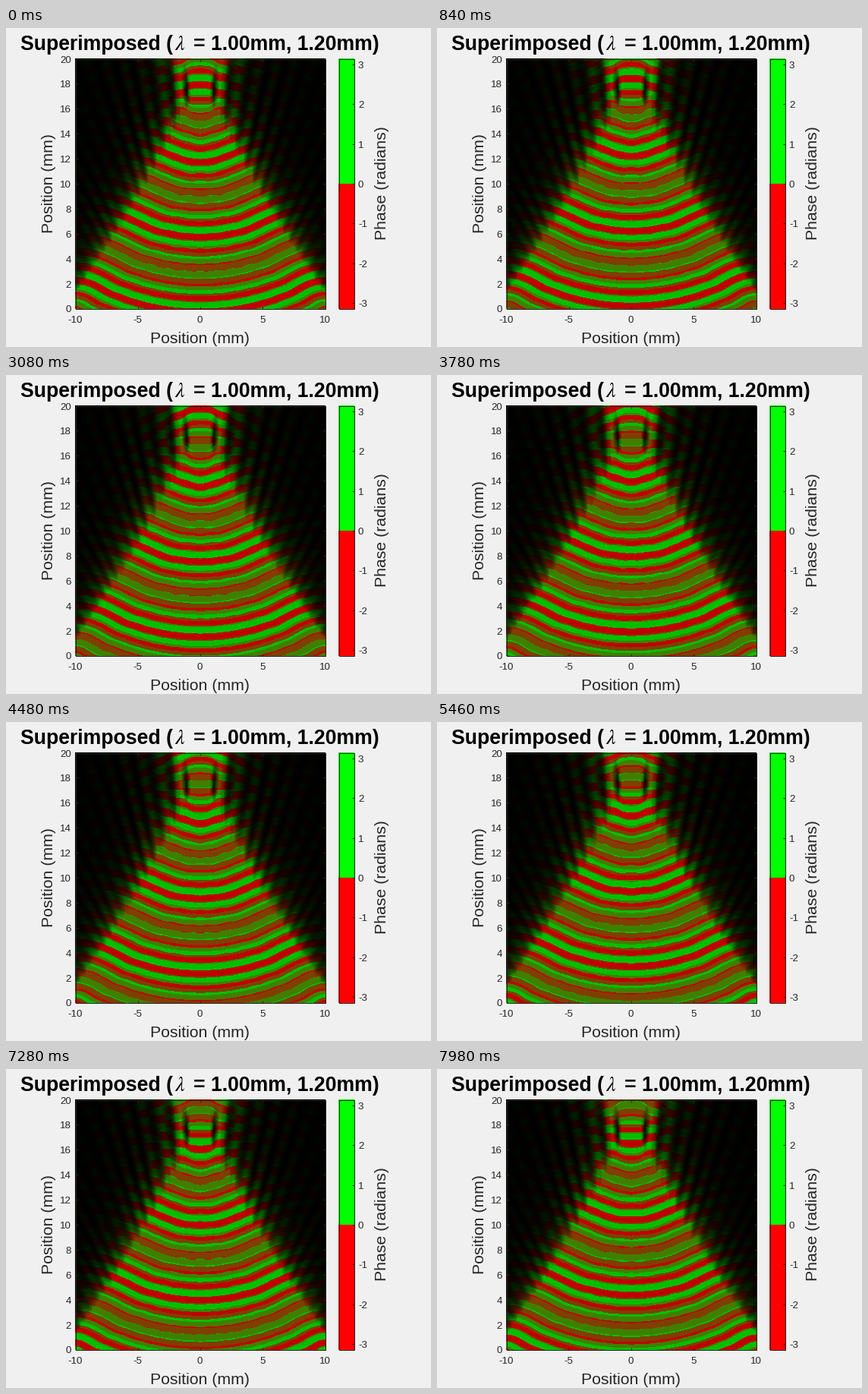
These frames come from a looping animation (560x420 px, 8 s). A matplotlib script:

```python
import numpy as np
import matplotlib.pyplot as plt
from matplotlib.animation import FuncAnimation

plt.rcParams["font.family"] = "Liberation Sans"
plt.rcParams["mathtext.fontset"] = "stix"

W, H = 560, 420
LEFT, TOP, SIZE = 91, 40, 329          # plot area in pixels
BAR_X, BAR_W = 438, 21
INK = (0.15, 0.15, 0.15)

HALF, DEPTH, FOCUS = 10.0, 20.0, 17.5  # mm
WAVES = (1.0, 1.2)                     # wavelengths, mm
WEIGHTS = (0.25, 0.5)                  # half-transparent layers over black
CLIP = 0.065                           # intensity shown at full brightness
ADVANCE = 0.0815                       # mm travelled per step
TICK_MS, STEP_MS, LOOP_MS = 20, 140, 8000

N = SIZE + 1
SOURCES = 200
pitch = 2 * HALF / SOURCES
x = (np.arange(N // 2) + 0.5) * 2 * HALF / N          # right half only
y = DEPTH - (np.arange(N) + 0.5) * DEPTH / N


def focused_field(wavelength):
    """Sum of point sources on y = 0, delayed to meet at the focus."""
    k = 2 * np.pi / wavelength
    half = np.zeros((N, N // 2), complex)
    for s in (np.arange(SOURCES) + 0.5) * pitch - HALF:
        r = np.hypot(x - s, y[:, None])
        half += np.exp(1j * k * (r - np.hypot(s, FOCUS) + FOCUS)) / r
    half *= pitch * np.exp(-0.25j * np.pi)
    return np.hstack([half[:, ::-1], half])


fields = [focused_field(w) for w in WAVES]
glows = [255 * a * np.minimum(1, np.abs(u) ** 2 / CLIP)
         for a, u in zip(WEIGHTS, fields)]


def picture(step):
    rgb = np.zeros((N, N, 3))
    for u, glow, w in zip(fields, glows, WAVES):
        positive = (u * np.exp(-2j * np.pi * ADVANCE * step / w)).imag > 0
        rgb[..., 0] += glow * ~positive
        rgb[..., 1] += glow * positive
    return rgb.astype(np.uint8)


pictures = [picture(n) for n in range(-(-LOOP_MS // STEP_MS))]

fig = plt.figure(figsize=(W / 100, H / 100), dpi=100, facecolor="#f0f0f0")
ax = fig.add_axes([0, 0, 1, 1])
ax.axis("off")


def label(px, py, text, size, color=INK, **kw):
    kw.setdefault("ha", "center")
    ax.text(px, py, text, fontsize=size * 0.72, color=color, va="baseline",
            rotation_mode="anchor", **kw)


def line(x0, y0, x1, y1):
    ax.plot([x0 + 0.5, x1 + 0.5], [y0 + 0.5, y1 + 0.5], color=INK, lw=0.72,
            solid_capstyle="butt", zorder=3)


def frame(px, py, w, h):
    ax.add_patch(plt.Rectangle((px + 0.5, py + 0.5), w - 1, h - 1, fill=False,
                               ec=INK, lw=0.72, zorder=3))


image = ax.imshow(pictures[0], extent=(LEFT, LEFT + N, TOP + N, TOP),
                  interpolation="nearest", aspect="auto")
right, bottom = LEFT + SIZE, TOP + SIZE
frame(LEFT, TOP, N, N)

for v in range(-10, 11, 5):
    px = LEFT + SIZE * (v + HALF) / (2 * HALF)
    line(px, bottom, px, bottom - 3)
    line(px, TOP, px, TOP + 3)
    label(px, 388, str(v), 13.33)
for v in range(0, 21, 2):
    py = bottom - SIZE * v / DEPTH
    line(LEFT, py, LEFT + 3, py)
    line(right, py, right - 3, py)
    label(86, py + 5.5, str(v), 13.33, ha="right")

# two-colour phase bar
for py, color in ((TOP, "#00ff00"), (TOP + N / 2, "#ff0000")):
    ax.add_patch(plt.Rectangle((BAR_X, py), BAR_W, N / 2, fc=color, lw=0))
frame(BAR_X, TOP, BAR_W, N)
for v in range(-3, 4):
    py = TOP + SIZE / 2 - v * SIZE / (2 * np.pi)
    line(BAR_X + BAR_W - 4, py, BAR_X + BAR_W - 1, py)
    label(464, py + 5.5, str(v), 13.33, ha="left")

label(19, 29, "Superimposed (", 26.67, "black", weight="bold", ha="left")
label(229.5, 29, r"$\lambda$", 28, "black")
label(491.5, 29, "= 1.00mm, 1.20mm)", 26.67, "black", weight="bold", ha="right")
label(255.5, 415, "Position (mm)", 21.33)
label(62, 204, "Position (mm)", 21.33, rotation=90)
label(501, 204.5, "Phase (radians)", 21.33, rotation=90)

ax.set_xlim(0, W)
ax.set_ylim(H, 0)


def update(i):
    image.set_data(pictures[i * TICK_MS // STEP_MS])
    return [image]


anim = FuncAnimation(fig, update, frames=LOOP_MS // TICK_MS, interval=TICK_MS,
                     repeat=True, repeat_delay=0, cache_frame_data=False)
plt.show()
```
